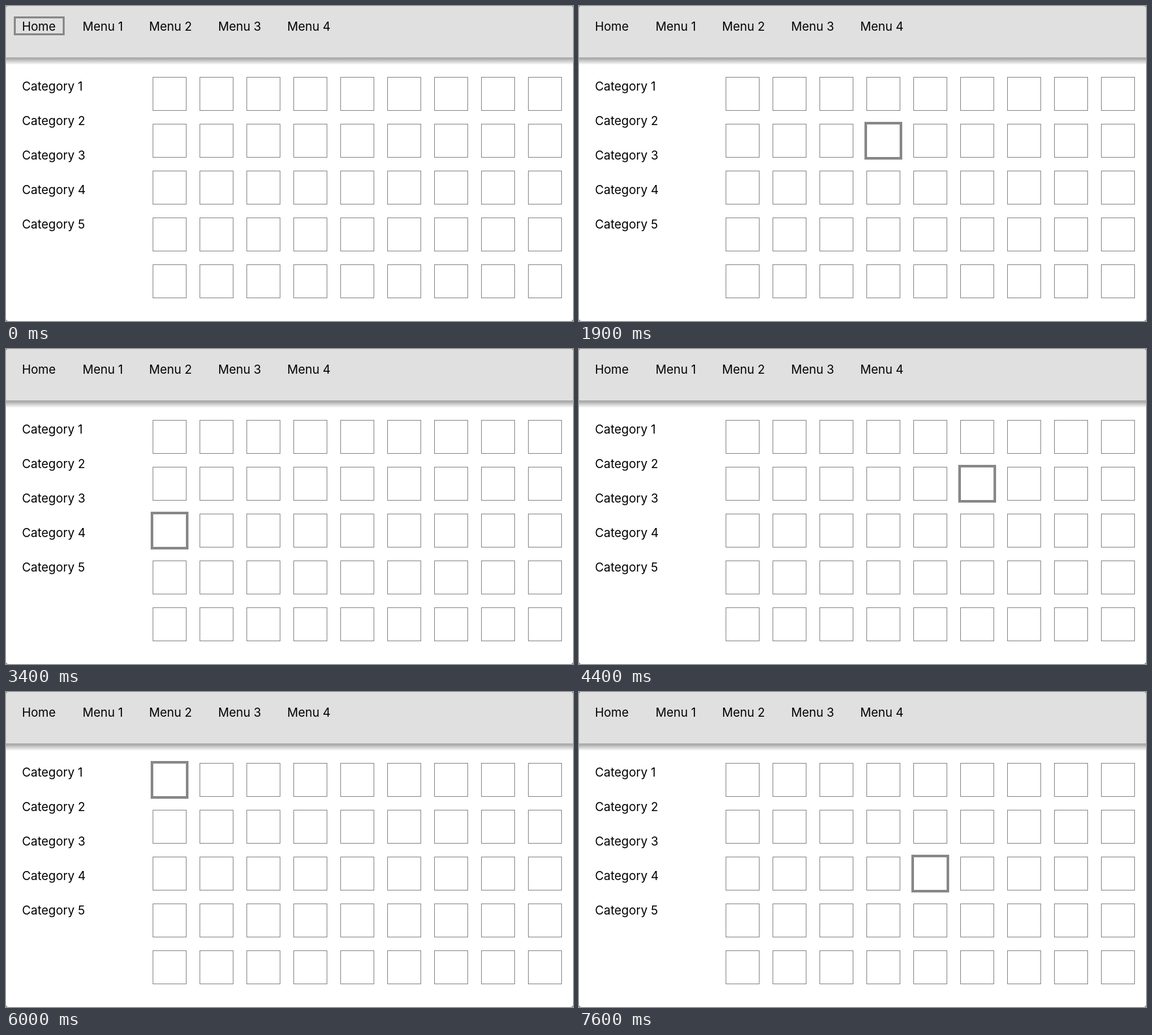
An HTML page for the animation above (8 s loop, 870x484 px).

```html
<!DOCTYPE html>
<html lang="en">
<head>
<meta charset="utf-8">
<title>Spatial navigation</title>
<style>
  html, body { margin: 0; width: 100%; height: 100%; overflow: hidden; background: #777; }
  svg { display: block; }
  text { font: 18.5px Inter, "Open Sans", sans-serif; fill: #000; }
  .cell { fill: #fff; stroke: #888; }
  #ring { fill: none; stroke: #888; }
</style>
</head>
<body>
<svg width="870" height="484" viewBox="0 0 870 484">
  <defs>
    <linearGradient id="shade" x2="0" y2="1">
      <stop offset="0" stop-color="#a4a4a4"/>
      <stop offset=".25" stop-color="#b2b2b2"/>
      <stop offset=".6" stop-color="#d6d6d6"/>
      <stop offset="1" stop-color="#fbfbfb"/>
    </linearGradient>
    <clipPath id="window"><rect width="870" height="484" rx="4"/></clipPath>
  </defs>
  <g clip-path="url(#window)">
    <rect width="870" height="484" fill="#fff"/>
    <rect width="870" height="79" fill="#e0e0e0"/>
    <rect y="79" width="870" height="11" fill="url(#shade)"/>
    <g id="items"></g>
    <rect id="ring"/>
  </g>
</svg>
<script>
const LOOP = 8000;
const items = document.getElementById('items');
const ring = document.getElementById('ring');

// Focus boxes: outer x, y, width, height and line weight
const menu = [[12, 78], [105, 89], [207, 92], [313, 92], [419, 92]]
  .map(([x, w]) => [x, 16, w, 29, 3]);
const category = i => [22, 108 + 53 * (i - 1), 196, 29, 3];
const cell = (row, col) => [222 + 72 * col, 106 + 72 * row, 58, 58, 4];

const label = (x, y, text) => `<text x="${x}" y="${y}">${text}</text>`;

let markup = '';
menu.forEach(([x, y], i) => markup += label(x + 12.5, y + 22, i ? `Menu ${i}` : 'Home'));
for (let i = 1; i <= 5; i++) {
  const [x, y] = category(i);
  markup += label(x + 2.5, y + 22, `Category ${i}`);
}
for (let row = 0; row < 5; row++) {
  for (let col = 0; col < 9; col++) {
    const [x, y] = cell(row, col);
    markup += `<rect class="cell" x="${x + 3.5}" y="${y + 3.5}" width="51" height="51"/>`;
  }
}
items.innerHTML = markup;

// When the focus jumps, and where to
const moves = [
  [0, menu[0]],
  [300, category(1)], [500, category(2)], [700, category(3)], [900, category(4)],
  [1200, cell(2, 0)], [1300, cell(2, 1)], [1500, cell(2, 2)], [1700, cell(2, 3)],
  [1900, cell(1, 3)], [2200, cell(0, 3)],
  [2300, menu[4]], [2700, menu[3]], [2800, menu[2]],
  [3100, cell(0, 0)], [3200, cell(1, 0)], [3400, cell(2, 0)],
  [3600, cell(2, 1)], [3700, cell(2, 2)], [3900, cell(2, 3)], [4100, cell(2, 4)],
  [4200, cell(2, 5)], [4400, cell(1, 5)], [4600, cell(0, 5)],
  [5100, cell(0, 4)], [5500, cell(0, 3)], [5600, cell(0, 2)], [5800, cell(0, 1)],
  [6000, cell(0, 0)],
  [6100, category(1)], [6400, category(2)], [6500, category(3)], [6700, category(4)],
  [6900, cell(2, 0)], [7100, cell(2, 1)], [7300, cell(2, 2)], [7500, cell(2, 3)],
  [7600, cell(2, 4)]
];

function setRing([x, y, w, h, line]) {
  const attrs = { x: x + line / 2, y: y + line / 2, width: w - line, height: h - line, 'stroke-width': line };
  for (const name in attrs) ring.setAttribute(name, attrs[name]);
}

const start = performance.now();
function draw() {
  const t = (performance.now() - start) % LOOP;
  setRing(moves.findLast(([time]) => time <= t)[1]);
  requestAnimationFrame(draw);
}
draw();
</script>
</body>
</html>
```
